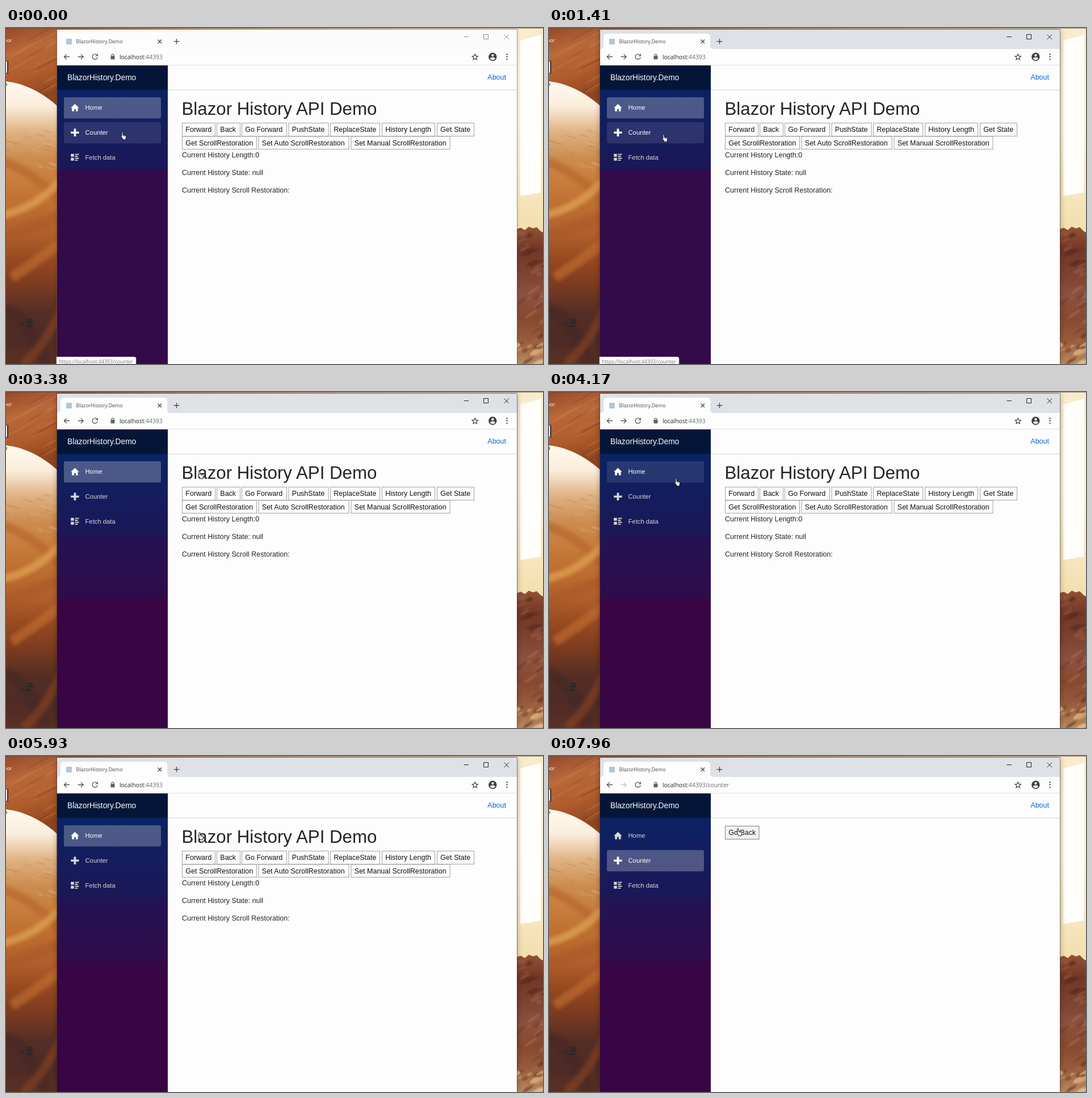
Write an HTML page with a canvas that moves like this. It is 946 px wide and 592 px high and loops after 8000 ms.

```html
<!DOCTYPE html>
<html lang="en">
<head>
<meta charset="utf-8">
<title>Blazor History API Demo</title>
<style>
  html, body { margin: 0; width: 100%; height: 100%; overflow: hidden; background: #8a4420; }
  #stage { position: relative; width: 946px; height: 592px; overflow: hidden; contain: strict; }
  canvas, svg, #win { position: absolute; left: 0; top: 0; display: block; }
  #win { left: 90px; top: 3px; width: 810px; height: 589px; background: #fdfdfd; }
  text { font: 12.5px "Liberation Sans", Arial, sans-serif; fill: #212529; white-space: pre; }
  .ui { font-family: "Open Sans", "Noto Sans", sans-serif; }
  .line { fill: none; stroke: #3c4043; stroke-width: 1.2; }
  .btn rect { fill: #fdfdfd; stroke: #a2a2a2; }
  .btn text { fill: #111; }
  .btn.hot rect { fill: #f3f3f3; stroke: #808080; }
  .btn.stale rect { stroke: #808080; }
  .nav rect { fill: #fff; fill-opacity: 0; }
  .nav text { font-size: 11.25px; fill: #d7d7d7; }
  .nav path { fill: #d7d7d7; }
  .nav.on rect { fill-opacity: .25; }
  .nav.hot rect { fill-opacity: .1; }
  .nav.on text, .nav.hot text, .nav.on path, .nav.hot path { fill: #fff; }
</style>
</head>
<body>
<div id="stage">
<canvas id="wall" width="946" height="592"></canvas>
<div id="win"></div>
<svg width="946" height="592" viewBox="0 0 946 592">
  <defs>
    <linearGradient id="side" gradientUnits="userSpaceOnUse" x1="0" y1="66" x2="0" y2="592">
      <stop offset="0" stop-color="#052767"/>
      <stop offset=".085" stop-color="#0b2363"/>
      <stop offset=".352" stop-color="#1c1757"/>
      <stop offset=".354" stop-color="#231353"/>
      <stop offset=".564" stop-color="#300b4b"/>
      <stop offset=".566" stop-color="#380545"/>
    </linearGradient>
  </defs>

  <!-- browser frame -->
  <rect id="strip" x="90" y="3" width="810" height="34"/>
  <path id="tab" fill="#fdfdfd" d="M90 37q6 0 6-6V16q0-6 6-6H278q6 0 6 6V31q0 6 6 6z"/>
  <rect x="106" y="19" width="10" height="10" fill="#a9c8e2"/>
  <text class="ui" x="123.5" y="27" style="font-size:8.8px;fill:#45494d">BlazorHistory.Demo</text>
  <path class="line" d="M267.5 20.5l6.5 6.5m0-6.5l-6.5 6.5M300.5 19v9.5M295.7 23.7h9.6"/>
  <path id="controls" fill="none" d="M806.5 15.5h8.5M841.5 11.5h8v8h-8zM877.5 11.5l8.5 8.5m0-8.5l-8.5 8.5"/>
  <path class="line" d="M112 50.7h-9.6m4.4-4.4l-4.4 4.4l4.4 4.4"/>
  <path class="line" id="fwd" d="M126.5 50.7h9.6m-4.4-4.4l4.4 4.4l-4.4 4.4"/>
  <path class="line" d="M160.5 48a4.6 4.6 0 1 0 .7 3.6M161.3 45.6v3.4h-3.6"/>
  <path fill="#5f6368" d="M184.5 49h7v6.3h-7z"/>
  <path class="line" style="stroke:#5f6368" d="M186 49.5v-1.4a2 2 0 0 1 4 0v1.4"/>
  <text class="ui" x="200" y="54.6" style="font-size:10.35px;fill:#26282b">localhost<tspan id="path" fill="#686c70"></tspan></text>
  <path class="line" d="M826.2 46l1.5 3.4l3.6.3l-2.8 2.4l.9 3.6l-3.2-1.9l-3.2 1.9l.9-3.6l-2.8-2.4l3.6-.3z"/>
  <circle cx="857.3" cy="50.8" r="7.2" fill="#3c4043"/>
  <circle cx="857.3" cy="48.3" r="2.2" fill="#fdfdfd"/>
  <path fill="#fdfdfd" d="M852.8 54q0-2.3 4.5-2.3t4.5 2.3q-1.6 2.3-4.5 2.3t-4.5-2.3z"/>
  <g fill="#3c4043"><circle cx="882.5" cy="46.5" r="1.2"/><circle cx="882.5" cy="50.8" r="1.2"/><circle cx="882.5" cy="55.1" r="1.2"/></g>
  <path d="M90 65.5H900" stroke="#dcdde0"/>

  <!-- page -->
  <rect x="90" y="66" width="195" height="526" fill="url(#side)"/>
  <rect id="flat" x="90" y="251" width="195" height="341" fill="#330a4a"/>
  <rect x="90" y="66" width="195" height="43" fill="#031638"/>
  <text x="108" y="92" style="font-size:13.75px;fill:#fff">BlazorHistory.Demo</text>
  <path d="M285 109H900" stroke="#d6d5d5"/>
  <text x="848.3" y="91" style="fill:#0366d6">About</text>
  <g id="menu"></g>
  <g id="home">
    <text x="309.5" y="153" style="font-size:31.25px">Blazor History API Demo</text>
    <text x="310" y="227.5">Current History Length:0</text>
    <text x="310" y="258.7">Current History State: null</text>
    <text x="310" y="290">Current History Scroll Restoration:</text>
  </g>
  <g id="counter"></g>
  <g id="status">
    <path id="bubble" fill="#fdfdfd" stroke="#c8c8c8" stroke-width=".6"/>
    <text class="ui" id="link" x="93" y="591" style="font-size:8.9px;fill:#74777b"></text>
  </g>

  <g id="cursor" stroke="#111" stroke-width=".9" fill="#fff" stroke-linejoin="round">
    <path id="hand" d="M2.9.5q1.1 0 1.1 1.1V5.3l4.3.9q1.5.4 1.4 1.9l-.8 3.4v2.2H3.8v-1.5L.8 8.1q-.6-1.2.4-1.6q.8-.2 1.5.8h-.8V1.6Q1.9.5 2.9.5zM5.4 5.8v2M7.3 6.3v1.8"/>
    <path id="arrow" d="M.5.5v9.3l2.1-2l1.5 3.2l1.5-.7l-1.4-3h2.9z"/>
    <path id="ibeam" fill="none" d="M0 0h1.7q.8 0 .8.8v10.4q0 .8-.8.8H0M5 0H3.3q-.8 0-.8.8v10.4q0 .8.8.8H5"/>
  </g>
</svg>
</div>
<script>
const $ = id => document.getElementById(id);
const show = (id, on) => $(id).style.display = on ? '' : 'none';

// Wallpaper
const g = $('wall').getContext('2d');
let seed = 7;
const rnd = () => (seed = seed * 16807 % 2147483647) / 2147483647;
function ramp(x1, y0, y1, ...stops) {
  const r = g.createLinearGradient(0, y0, x1, y1);
  stops.forEach((c, i) => r.addColorStop(i / (stops.length - 1), c));
  return r;
}
function area(fill, x, y, w, h) {
  g.fillStyle = fill;
  g.fillRect(x, y, w, h);
}
function band(color, width, x0, y0, cx, cy, x1, y1) {
  g.strokeStyle = color;
  g.lineWidth = width;
  g.beginPath();
  g.moveTo(x0, y0);
  g.quadraticCurveTo(cx, cy, x1, y1);
  g.stroke();
}
function streaks(n, x, y, w, h, len, thick, angle, colors) {
  for (let i = 0; i < n; i++) {
    g.fillStyle = colors[i % colors.length];
    g.beginPath();
    g.ellipse(x + rnd() * w, y + rnd() * h, len * (.4 + rnd()), thick * (.4 + rnd()), angle, 0, 7);
    g.fill();
  }
}
function within(outline, paint) {
  g.save();
  g.beginPath();
  outline();
  g.clip();
  paint();
  g.restore();
}
area(ramp(40, 0, 130, '#96492a', '#b9683a', '#b05c2c', '#8f451f'), 0, 0, 100, 140);
streaks(22, -10, 0, 110, 120, 30, 2, -.5, ['#d08a5544', '#7d3c1c44', '#c8794444']);
within(() => {
  g.moveTo(0, 94);
  g.bezierCurveTo(35, 98, 66, 115, 92, 139);
  g.lineTo(92, 592);
  g.lineTo(0, 592);
}, () => {
  area(ramp(0, 92, 592, '#fffaf0', '#fbeedb', '#dfb284', '#cc8d50', '#c67c3a', '#bd6c30', '#b05e2b', '#95491f', '#793a20', '#542e25', '#4d2b26', '#5c3022'), 0, 92, 92, 500);
  g.filter = 'blur(3px)';
  band('#b8652caa', 16, -10, 235, 40, 245, 100, 310);
  band('#e3a857aa', 14, -10, 330, 50, 320, 100, 265);
  band('#a9562888', 18, -10, 372, 45, 350, 100, 330);
  band('#c5713399', 18, 10, 440, 55, 410, 100, 375);
  band('#45282599', 22, -10, 500, 30, 490, 70, 592);
  band('#8a452499', 16, 30, 592, 70, 560, 100, 490);
  g.filter = 'none';
  streaks(26, -10, 180, 110, 70, 10, 1.2, .3, ['#ecc08e44', '#b0703a44']);
});
streaks(9, 26, 514, 18, 12, 4, 1.5, .3, ['#25292a']);
area('#333', 0, 58, 4, 22);
area('#e9e9e9', 0, 59, 2, 20);
area('#9a8c80', 0, 97, 2, 5);
g.font = '9px "Open Sans", sans-serif';
g.fillStyle = '#fff';
g.fillText('oor', -4, 25);

const sky = g.createLinearGradient(90, 0, 900, 0);
['#a8623a', '#dcb28a', '#eed7b4', '#f8ecd0'].forEach((c, i) => sky.addColorStop(i / 3, c));
area(sky, 90, 0, 810, 4);

area(ramp(0, 0, 352, '#f8ebcb', '#fbf1da', '#fbf0d6', '#f8e9c6', '#f3dfae'), 900, 0, 46, 360);
within(() => {
  g.moveTo(906, 22);
  g.lineTo(943, 12);
  g.lineTo(942, 290);
  g.lineTo(906, 296);
}, () => area('#fffefa', 900, 0, 46, 300));
within(() => {
  g.moveTo(890, 357);
  [354, 352, 356, 350, 353, 351, 358, 362].forEach((y, i) => g.lineTo(900 + i * 7, y));
  g.lineTo(949, 592);
  g.lineTo(890, 592);
}, () => {
  area(ramp(0, 350, 592, '#925236', '#733727', '#7c4130', '#8c5140', '#87492f', '#995d3c', '#b98a5f'), 880, 348, 66, 244);
  g.filter = 'blur(1px)';
  streaks(16, 895, 356, 55, 80, 10, 3, -.4, ['#54281e88', '#a9694a66']);
  streaks(16, 895, 460, 55, 100, 11, 3, -.6, ['#6b362777', '#b0785566']);
  streaks(22, 895, 556, 55, 36, 9, 3, -.5, ['#e4c596aa', '#7b4530aa', '#d3a877aa']);
  g.filter = 'none';
});
area('#59443a99', 0, 0, 946, 1);

// Page parts
const button = (label, x, y, w, h = 23) =>
  `<g class="btn" data-id="${label}"><rect x="${x}" y="${y}" width="${w}" height="${h}"/>` +
  `<text x="${x + 5.8}" y="${y + 15.6}">${label}</text></g>`;
$('home').innerHTML += [
  ['Forward', 310.5, 58], ['Back', 371.5, 41], ['Go Forward', 415.5, 79], ['PushState', 498, 70],
  ['ReplaceState', 571.5, 87], ['History Length', 662.5, 93], ['Get State', 759.5, 65]
].map(([s, x, w]) => button(s, x, 167.5, w)).join('') + [
  ['Get ScrollRestoration', 310.5, 131], ['Set Auto ScrollRestoration', 445, 159],
  ['Set Manual ScrollRestoration', 608, 174]
].map(([s, x, w]) => button(s, x, 191, w, 22.5)).join('');
$('counter').innerHTML = button('Go Back', 310.5, 123.5, 59.5);

$('menu').innerHTML = [
  ['Home', 'M7.2 0L0 7h2v6h3.7V9h3v4h3.7V7h2z'],
  ['Counter', 'M5.4 0h3.7v5h5.2v3.5H9.1v5H5.4v-5H0V5h5.4z'],
  ['Fetch data', 'M0 .5h5.5v5H0zM0 7.5h5.5v5H0zM7.3.5h7v1.8h-7zM7.3 3.8h5v1.8h-5zM7.3 7.3h7v1.8h-7zM7.3 10.7h5v1.8h-5z']
].map(([s, d], i) => `<g class="nav" data-id="${s}" transform="translate(102 ${122 + i * 43.75})">
  <rect width="171" height="37.5" rx="3"/><path transform="translate(12.2 11.8)" d="${d}"/>
  <text x="37.5" y="22.2">${s}</text></g>`).join('');

// Times at which the page flips between home and counter
const flips = [1660, 3380, 4930, 5930, 7480];
// time, cursor, x, y, hovered part
const moves = [
  [0, 'hand', 202, 183, 'Counter'], [500, 'hand', 205, 211, 'Fetch data'],
  [620, 'hand', 205, 220, 'Fetch data'], [740, 'hand', 203, 211, 'Fetch data'],
  [860, 'hand', 201, 189, 'Counter'], [1010, 'hand', 199, 187, 'Counter'],
  [1780, 'hand', 232, 180, 'Counter'], [1900, 'arrow', 292, 162],
  [2020, 'hand', 322, 141, 'Go Back'], [2140, 'hand', 339, 140, 'Go Back'],
  [2290, 'hand', 338, 139, 'Go Back'], [3380, 'hand', 338, 139], [3500, 'ibeam', 339, 134],
  [3930, 'arrow', 288, 145], [4050, 'hand', 240, 151, 'Home'], [4170, 'hand', 221, 152, 'Home'],
  [4290, 'arrow', 262, 165], [4410, 'hand', 318, 185, 'Forward'],
  [4530, 'hand', 340, 194, 'Get ScrollRestoration'], [4650, 'hand', 343, 180, 'Forward'],
  [4930, 'hand', 343, 180], [5050, 'arrow', 346, 180], [5420, 'arrow', 348, 165],
  [5540, 'arrow', 347, 150], [5690, 'hand', 341, 138, 'Go Back'], [5810, 'hand', 338, 134, 'Go Back'],
  [5930, 'hand', 338, 134], [6050, 'ibeam', 339, 130], [6330, 'hand', 360, 174, 'Forward'],
  [6450, 'hand', 399, 199, 'Get ScrollRestoration'], [6600, 'hand', 385, 185, 'Back'],
  [6750, 'hand', 389, 181, 'Back'], [6870, 'hand', 404, 178, 'Back'],
  [6990, 'hand', 426, 177, 'Go Forward'], [7110, 'hand', 437, 176, 'Go Forward'],
  [7480, 'hand', 437, 176], [7600, 'arrow', 440, 176], [7720, 'arrow', 412, 155],
  [7840, 'hand', 334, 130, 'Go Back'], [7960, 'hand', 330, 127, 'Go Back']
];
const parts = document.querySelectorAll('[data-id]');

function draw(t) {
  const onCounter = flips.filter(f => f <= t).length % 2 === 1;
  const [, kind, x, y, hot] = moves.findLast(m => m[0] <= t);
  const active = t >= 1410;

  $('win').style.boxShadow = active
    ? '0 0 0 1px #46352c88, 0 1px 10px #0005' : '0 0 0 1px #6b5a5077, 0 1px 6px #0003';
  $('strip').setAttribute('fill', active ? '#dee1e6' : '#fbfbfc');
  $('controls').setAttribute('stroke', active ? '#222' : '#8c8c8c');
  $('fwd').style.stroke = onCounter ? '#b9bbbe' : '';
  $('path').textContent = ':44393' + (onCounter ? '/counter' : '');
  show('home', !onCounter);
  show('counter', onCounter);
  show('flat', t < 1660);

  const page = onCounter ? 'Counter' : 'Home';
  for (const p of parts) {
    const id = p.dataset.id;
    p.classList.toggle('hot', id === hot);
    p.classList.toggle('on', id === page);
    p.classList.toggle('stale', id === 'Get ScrollRestoration' && t >= 6600 && t < 6750);
  }

  const fetching = hot === 'Fetch data';
  show('status', t < 1900);
  $('link').textContent = 'https://localhost:44393/' + (fetching ? 'fetchdata' : 'counter');
  $('bubble').setAttribute('d', `M89 593V579.5H${fetching ? 234 : 226}q3 0 3 3V593z`);

  for (const c of ['hand', 'arrow', 'ibeam']) show(c, c === kind);
  $('cursor').setAttribute('transform', `translate(${x} ${y})`);
}

function tick() {
  draw(performance.now() % 8000);
  requestAnimationFrame(tick);
}
tick();
</script>
</body>
</html>
```
